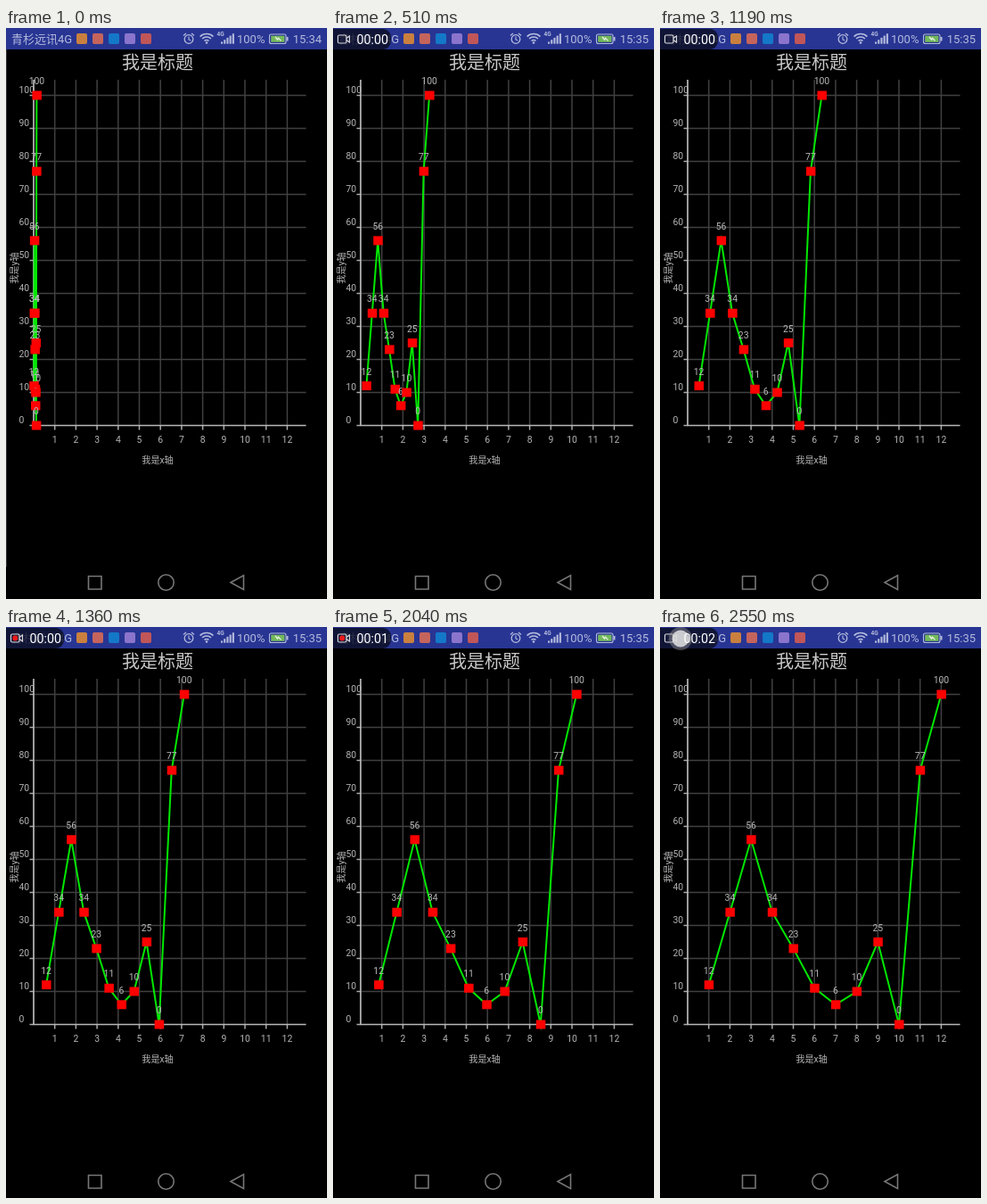
An HTML page with a canvas for the animation above (2720 ms loop, 360 px wide and 640 px high).

```html
<!DOCTYPE html>
<html lang="zh">
<head>
<meta charset="utf-8">
<style>
html, body { margin: 0; width: 100%; height: 100%; overflow: hidden; background: #000; }
canvas { display: block; width: 360px; height: 640px; }
</style>
</head>
<body>
<canvas id="stage" width="360" height="640"></canvas>
<script>
const ctx = document.getElementById('stage').getContext('2d');
const LOOP = 2720, STEP = 170;
const FONT = 'Roboto, "Noto Sans CJK SC", "Noto Sans CJK", sans-serif';
const LEFT = 31, BASE = 445.5, TOP = 58, RIGHT = 336.5, DX = 23.7, DY = 3.7;
const values = [12, 34, 56, 34, 23, 11, 6, 10, 25, 0, 77, 100];
const PALE = '#b4bbdd';

function text(s, x, y, size, color, align = 'left', weight = 400) {
  ctx.font = `${weight} ${size}px ${FONT}`;
  ctx.fillStyle = color;
  ctx.textAlign = align;
  ctx.fillText(s, x, y);
}

function rect(x, y, w, h, color) {
  ctx.fillStyle = color;
  ctx.fillRect(x, y, w, h);
}

function path(points, color, width, close) {
  ctx.beginPath();
  points.forEach(([x, y]) => ctx.lineTo(x, y));
  if (close) ctx.closePath();
  ctx.strokeStyle = color;
  ctx.lineWidth = width;
  ctx.stroke();
}

function arc(x, y, r, color, width, from = 0, to = Math.PI * 2) {
  ctx.beginPath();
  ctx.arc(x, y, r, from, to);
  ctx.strokeStyle = color;
  ctx.lineWidth = width;
  ctx.stroke();
}

function disc(x, y, r, color) {
  ctx.beginPath();
  ctx.arc(x, y, r, 0, Math.PI * 2);
  ctx.fillStyle = color;
  ctx.fill();
}

function pill(x, y, w, h, r, color) {
  ctx.beginPath();
  ctx.roundRect(x, y, w, h, r);
  ctx.fillStyle = color;
  ctx.fill();
}

function statusBar(n) {
  rect(0, 0, 360, 24, '#283593');
  text('青杉远讯4G', 6, 16.5, 13, PALE);
  ['#c9803f', '#c5645c', '#1478c8', '#8b74cc', '#c05658'].forEach((c, i) =>
    pill(79 + 18 * i, 6, 12, 12, 2, c));

  // alarm clock
  arc(205, 12.5, 4.8, PALE, 1.3);
  path([[205, 9.5], [205, 13], [207.3, 14]], PALE, 1.1);
  path([[199, 8.5], [202, 6]], PALE, 1.3);
  path([[208, 6], [211, 8.5]], PALE, 1.3);

  // wifi
  [3.5, 7, 10.5].forEach(r => arc(225, 17, r, PALE, 1.6, -Math.PI * 0.75, -Math.PI * 0.25));
  disc(225, 16.5, 1.3, PALE);

  text('4G', 236.5, 9, 6.5, PALE, 'left', 700);
  for (let i = 0; i < 5; i++) rect(241 + 3.2 * i, 15.5 - 2.3 * i, 2.1, 2.2 + 2.3 * i, PALE);
  text('100%', 259, 16.5, 13, PALE);

  // battery
  ctx.beginPath();
  ctx.roundRect(295.5, 7, 18.5, 10.5, 2);
  ctx.strokeStyle = PALE;
  ctx.lineWidth = 1.1;
  ctx.stroke();
  rect(314.5, 10, 2, 4.5, PALE);
  rect(297.2, 8.7, 15.2, 7.1, '#73b95b');
  path([[302, 10], [304.5, 13], [305.5, 11.3], [308.5, 14.4]], '#e8f2e4', 1.3);

  text(n ? '15:35' : '15:34', 354, 16.5, 13, PALE, 'right');
}

function recorder(n) {
  pill(-8, 1, 73, 23, 9, 'rgba(12,14,35,.82)');
  ctx.beginPath();
  ctx.roundRect(5.5, 8, 9.5, 9, 1.5);
  ctx.strokeStyle = '#d8d8dc';
  ctx.lineWidth = 1.2;
  ctx.stroke();
  path([[15, 11.5], [18.5, 9], [18.5, 16], [15, 13.5]], '#d8d8dc', 1.2);
  if (n >= 8 && n % 4 < 2) disc(10.3, 12.5, 3, '#f01818');
  if (n === 15) {
    disc(23, 13, 13, 'rgba(150,150,155,.45)');
    disc(23, 13, 9.5, 'rgba(225,225,225,.85)');
  }
  const seconds = n < 10 ? 0 : n < 14 ? 1 : 2;
  text('00:0' + seconds, 26.5, 17.5, 14.3, '#fff');
}

function axes() {
  text('我是标题', 170, 46, 20, '#c8c8c8', 'center');
  for (let i = 1; i <= 12; i++) {
    const x = LEFT + DX * i;
    path([[x, TOP], [x, BASE]], '#404040', 1.5);
    path([[x, BASE], [x, 450.5]], '#aaa', 1.5);
    text(i, x, 465, 10.4, '#b4b4b4', 'center');
  }
  for (let v = 0; v <= 100; v += 10) {
    const y = BASE - DY * v;
    if (v) path([[LEFT, y], [RIGHT, y]], '#404040', 1.5);
    path([[26.5, y], [LEFT, y]], '#aaa', 1.5);
    text(v, 14.5, y - 3, 10.4, '#b4b4b4');
  }
  path([[LEFT, TOP], [LEFT, BASE], [RIGHT, BASE]], '#b8b8b8', 1.7);
  text('我是x轴', 170, 488, 10.2, '#b4b4b4', 'center');
  ctx.save();
  ctx.translate(12.7, 269);
  ctx.rotate(-Math.PI / 2);
  text('我是y轴', 0, 0, 10.2, '#b4b4b4', 'center');
  ctx.restore();
}

function series(spread) {
  const points = values.map((v, i) => [LEFT + DX * (i + 1) * spread, BASE - DY * v]);
  path(points, '#00e800', 2);
  points.forEach(([x, y], i) => {
    rect(x - 5, y - 5, 10.5, 10, '#f00');
    text(values[i], x, y - 12.5, 10.4, '#b8b8b8', 'center');
  });
}

function navBar() {
  const gray = '#777';
  path([[92.5, 614.5], [107, 614.5], [107, 629], [92.5, 629]], gray, 1.6, true);
  arc(179.5, 621.5, 8.7, gray, 1.6);
  path([[252, 621.5], [266.5, 613.5], [266.5, 629.5]], gray, 1.6, true);
}

function draw(now) {
  const n = Math.floor(now % LOOP / STEP);
  const spread = n ? Math.min(1, 0.271 + 0.0645 * (n - 3)) : 0.012;
  rect(0, 0, 360, 640, '#000');
  if (!n) rect(0, 24, 1, 580, '#383838');
  axes();
  series(spread);
  statusBar(n);
  if (n) recorder(n);
  navBar();
}

const start = performance.now();
function tick() {
  draw(performance.now() - start);
  requestAnimationFrame(tick);
}
tick();
</script>
</body>
</html>
```
